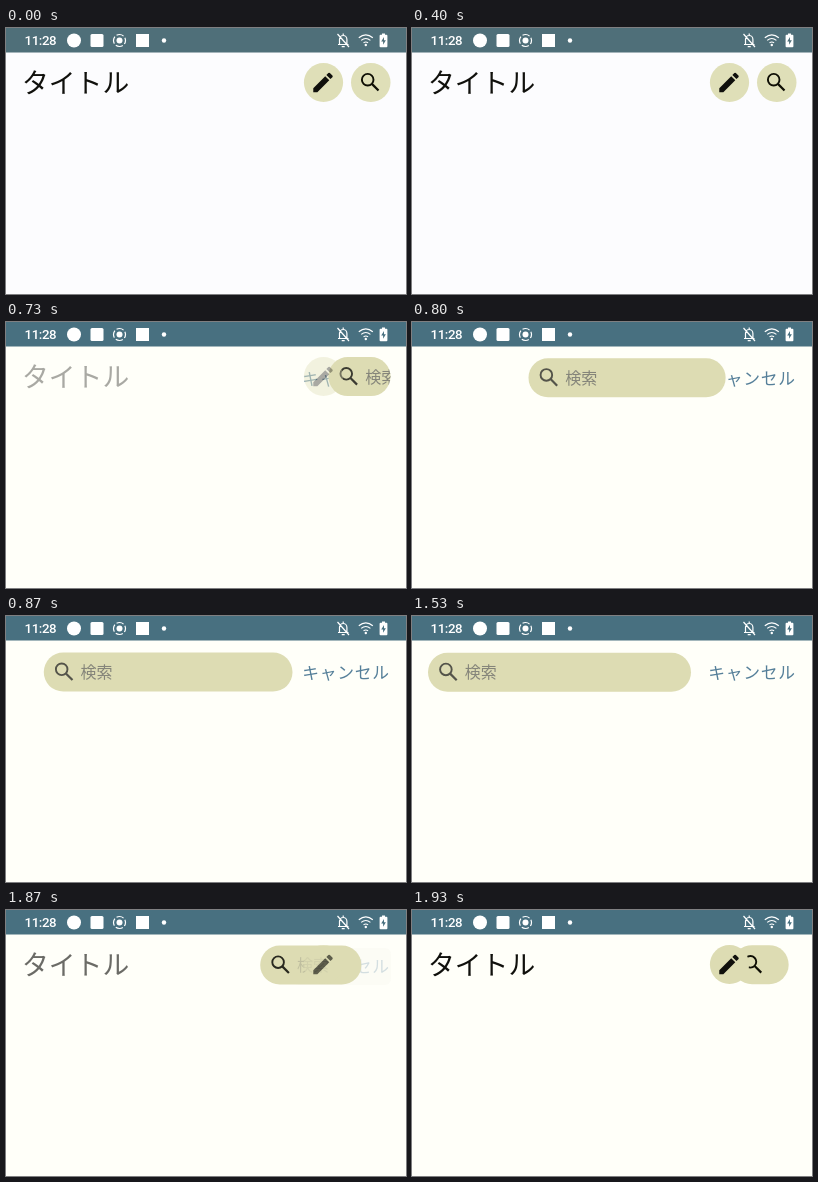
An HTML page that plays this animation: 400x266 px, repeating every 1990 ms.

```html
<!DOCTYPE html>
<html lang="ja">
<head>
<meta charset="utf-8">
<title>検索バー</title>
<style>
html, body { margin: 0; width: 100%; height: 100%; overflow: hidden; }
svg { display: block; width: 100vw; height: 100vh; }
text { font-family: "Noto Sans CJK JP", "Noto Sans CJK", "Noto Sans", sans-serif; }
.clock { font: 500 13.3px Roboto, sans-serif; letter-spacing: -.4px; }
</style>
</head>
<body>
<svg viewBox="0 0 400 266">
  <defs>
    <clipPath id="clip"><rect id="clipBox" height="39" rx="19.5"/></clipPath>
  </defs>
  <rect id="page" width="400" height="266"/>
  <rect id="bar" width="400" height="24.5"/>

  <g fill="#fff">
    <text class="clock" x="18.5" y="17.3">11:28</text>
    <circle cx="68" cy="12.5" r="7"/>
    <rect x="84.5" y="6" width="13" height="13" rx="1.5"/>
    <circle cx="113.5" cy="12.5" r="3"/>
    <circle cx="113.5" cy="12.5" r="6" fill="none" stroke="#fff" stroke-width="1.2" stroke-dasharray="7.4 2" stroke-dashoffset="3.7"/>
    <rect x="130" y="6" width="13" height="13"/>
    <circle cx="158" cy="12.5" r="2.2"/>
  </g>
  <g fill="none" stroke="#fff" stroke-width="1.2">
    <path d="M332 16.5h10.5M333.5 16.5v-5a3.7 4 0 0 1 7.4 0v5M337.2 7.5v-2M335.7 18.6h3M331.5 6l11.5 13"/>
    <path d="M352.8 9.8q7-6 14 0M355.2 12.4q4.6-3.8 9.2 0M357.5 14.9q2.3-1.8 4.6 0"/>
  </g>
  <circle cx="359.8" cy="17" r="1.2" fill="#fff"/>
  <path d="M376 5.5h3v1.3h1.4a1 1 0 0 1 1 1v10.4a1 1 0 0 1-1 1h-5.8a1 1 0 0 1-1-1V7.8a1 1 0 0 1 1-1h1.4z" fill="#fff"/>
  <path id="bolt" d="M378 9l-2.8 4.4h1.9v3.4l2.8-4.6H378z"/>

  <g id="cancel">
    <rect id="ripple" x="287" y="38" width="98" height="37" rx="6" fill="#c8c9b8"/>
    <text x="296.2" y="62.5" font-size="16.8" letter-spacing=".75" fill="#557f99">キャンセル</text>
  </g>
  <rect id="pill" height="39" rx="19.5"/>
  <g clip-path="url(#clip)">
    <text id="hint" font-size="16" fill="#85857a">検索</text>
    <g id="lens" fill="none">
      <circle cx="-2.6" cy="-2.6" r="5.8" stroke-width="1.9"/>
      <path d="M1.6 1.6l6.6 6.6" stroke-width="2.2"/>
    </g>
  </g>
  <g id="head">
    <text x="16" y="65" font-size="26.8" fill="#10100c">タイトル</text>
    <circle id="edit" cx="317.5" cy="54.5" r="19.6"/>
    <path transform="translate(317 54.5) scale(1.08) translate(-12 -12)" fill="#10100c"
      d="M3 17.25V21h3.75L17.81 9.94l-3.75-3.75zM20.71 7.04a1 1 0 0 0 0-1.41l-2.34-2.34a1 1 0 0 0-1.41 0l-1.83 1.83 3.75 3.75z"/>
  </g>
</svg>
<script>
const LOOP = 1990;
const STEPS = [0, 400, 470, 540, 600, 670, 730, 800, 870,
               1530, 1600, 1670, 1730, 1800, 1870, 1930];
const $ = id => document.getElementById(id);
const clamp = v => Math.max(0, Math.min(1, v));
const ramp = (t, from, to) => clamp((t - from) / (to - from));
const mix = (a, b, k) => a + (b - a) * k;

function set(id, attrs) {
  for (const key in attrs) $(id).setAttribute(key, attrs[key]);
}

// Critically damped spring from 0 to 1
function spring(ms) {
  const x = Math.max(0, ms) * 0.0284;
  return 1 - (1 + x) * Math.exp(-x);
}

function draw(t) {
  const closing = t >= 1780;
  const open = closing ? 1 - spring(t - 1780) : spring(t - 715);
  const shown = closing ? ramp(t, 1790, 1920) : 1 - ramp(t, 640, 780);
  const cancel = closing ? 1 - ramp(t, 1780, 1900) : ramp(t, 670, 750);
  const hint = closing ? 1 - ramp(t, 1780, 1915) : ramp(t, 670, 730);

  const early = t < 470;
  const page = early ? "#fcfcfe" : "#fffff9";
  const bar = early ? "#4f6f79" : "#487080";
  const tone = early ? "#dfdfb8" : "#dddcb3";

  const left = mix(345, 16, open);
  const rightK = closing ? open : ramp(open, 0.07, 1);
  const width = mix(384.5, 279, rightK) - left;
  const top = mix(35, 36.7, open);
  const lensX = left + mix(19.3, 20.5, clamp(open * 14));
  const ink = Math.round(mix(84, 14, shown));

  set("page", { fill: page });
  set("bar", { fill: bar });
  set("bolt", { fill: bar });
  set("edit", { fill: tone });
  set("head", { opacity: shown });
  set("cancel", { opacity: cancel });
  set("ripple", { opacity: ramp(t, 1600, 1730) * 0.22 });
  set("pill", { x: left, y: top, width, fill: tone });
  set("clipBox", { x: left, y: top, width });
  set("hint", { x: lensX + 16.3, y: top + 25.4, opacity: hint });
  set("lens", {
    transform: `translate(${lensX} ${top + 19.3})`,
    stroke: `rgb(${ink},${ink},${ink - 10})`
  });
}

function tick(now) {
  const t = now % LOOP;
  draw(STEPS.filter(s => s <= t).pop());
  requestAnimationFrame(tick);
}
draw(0);
requestAnimationFrame(tick);
</script>
</body>
</html>
```
